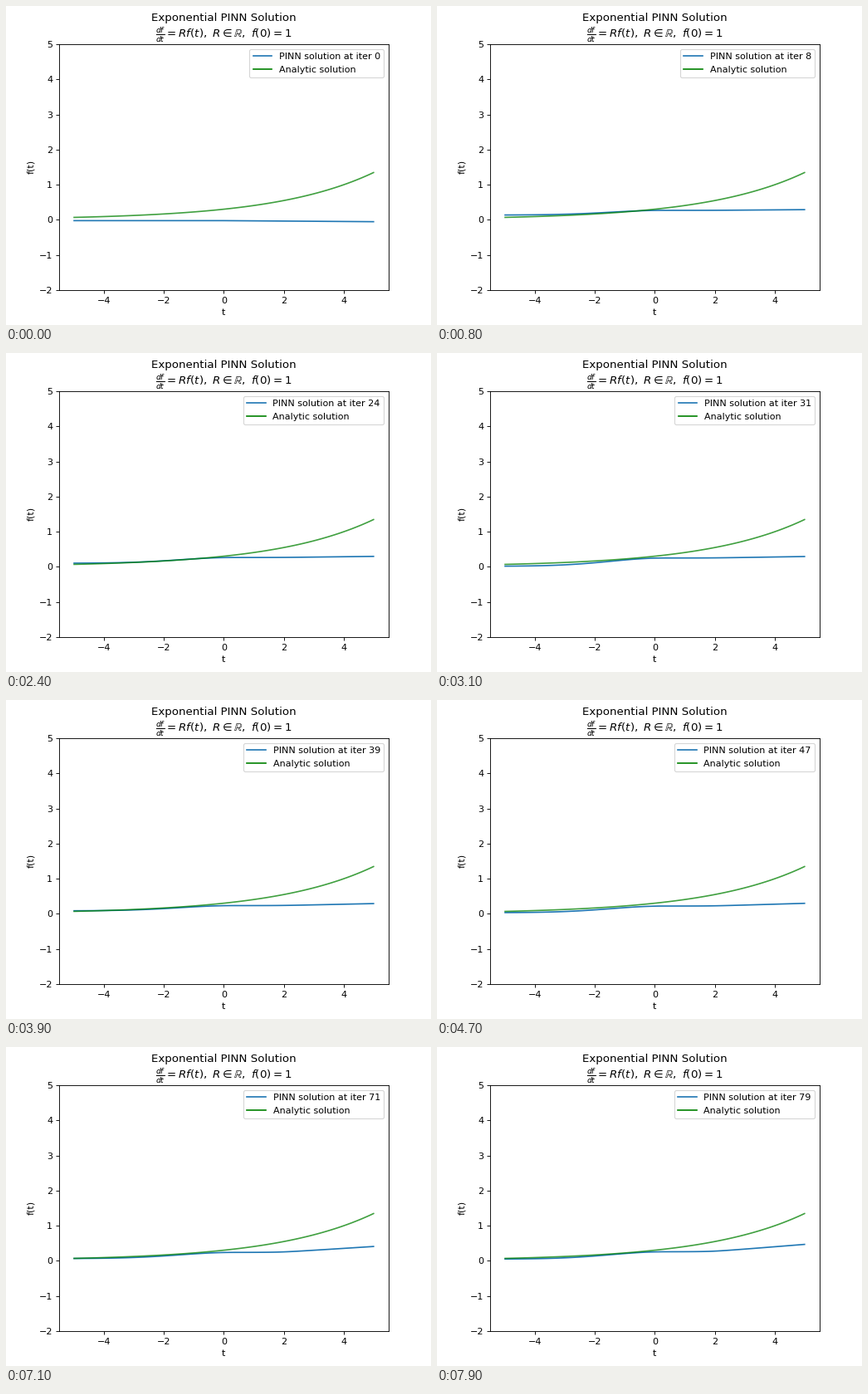
These frames come from a looping animation (512 px wide and 384 px high, 8 s). A matplotlib script:

```python
import numpy as np
import matplotlib.pyplot as plt
from matplotlib.animation import FuncAnimation

FRAMES, INTERVAL = 80, 100
RATE, START = 0.3, 0.3
TAU = 2 * np.pi


def network(t, step):
    """Network output: a rise from the left end to a shelf, then a ramp."""
    ringing = -np.exp(-step / 30) * np.cos(TAU * step / 15.5)
    left = 0.053 + 0.11 * ringing
    shelf = 0.244 + 0.03 * np.cos(TAU * (step - 12) / 84)
    gain = 0.02 + 0.193 * (step / (FRAMES - 1)) ** 2.3

    rise = np.exp(-np.minimum(t - 0.3, 0) ** 2 / 6.2)
    x = t - 1.9
    ramp = (x + np.hypot(x, 0.5)) / 6.24
    fit = left + (shelf - left) * rise + gain * ramp

    # The first few iterations leave the untrained, almost flat line
    untrained = -0.026 - 0.006 * np.maximum(t, 0)
    return fit + (untrained - fit) * np.exp(-step / 2)


t = np.linspace(-5, 5, 100)
fig, ax = plt.subplots(figsize=(6.4, 4.8), dpi=80)
pinn, = ax.plot(t, network(t, 0), label="PINN solution at iter 0")
ax.plot(t, START * np.exp(RATE * t), "g", alpha=0.75, label="Analytic solution")
ax.set_ylim(-2, 5)
ax.set_xlabel("t")
ax.set_ylabel("f(t)")
ax.set_title("Exponential PINN Solution\n"
             r"$\frac{df}{dt} = Rf(t),\ R \in \mathbb{R},\ f(0)=1$")
legend = ax.legend(loc="upper right")
legend.get_lines()[1].set_alpha(1)


def update(step):
    pinn.set_ydata(network(t, step))
    legend.get_texts()[0].set_text(f"PINN solution at iter {step}")
    return pinn, legend


anim = FuncAnimation(fig, update, frames=FRAMES, interval=INTERVAL,
                     repeat=True, repeat_delay=0, blit=False)
plt.show()
```
